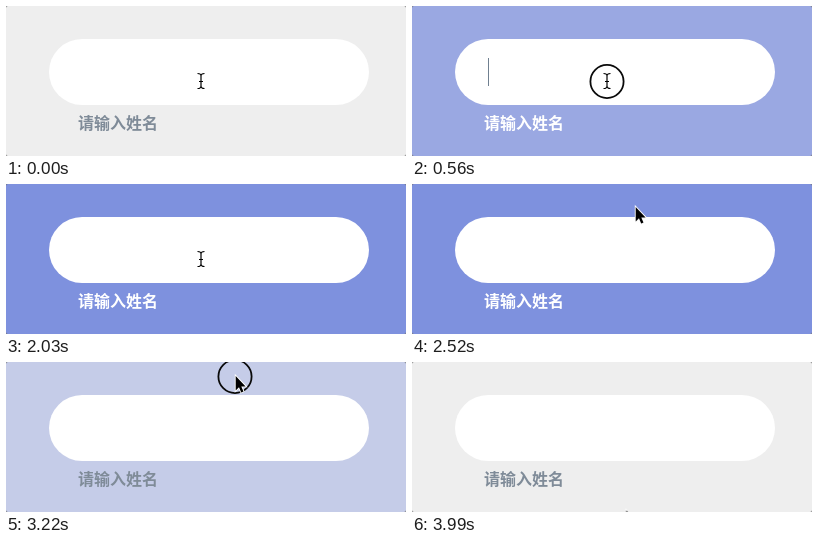
An HTML page for the animation above (4060 ms loop, 400 px wide and 150 px high).

```html
<!DOCTYPE html>
<html lang="zh-CN">
<head>
<meta charset="utf-8">
<title>Input focus</title>
<style>
  html, body { margin: 0; width: 100%; height: 100%; overflow: hidden; background: #777; }
  svg { display: block; width: 400px; height: 150px; }
  .page, .label, .caret, .pointer, .ring, .beam, .arrow { animation: 4060ms linear infinite; }

  .page { animation-name: page; }
  .label { animation-name: label; animation-timing-function: step-end; font: bold 16px "Noto Sans CJK SC", "Noto Sans CJK", sans-serif; }
  .caret { animation-name: caret; animation-timing-function: step-end; fill: #708090; }
  .pointer { animation-name: pointer; }
  .ring { animation-name: ring; fill: none; stroke: #0a0a0a; stroke-width: 1.8px; }
  .beam { animation-name: beam; animation-timing-function: step-end; fill: none; }
  .arrow { animation-name: arrow; animation-timing-function: step-end; fill: #000; stroke: #fff; stroke-width: 1.8px; paint-order: stroke; }

  @keyframes page {
    0%, 10.468% { fill: #eee; animation-timing-function: ease; }
    17.857% { fill: #7e91de; }
    76.601% { fill: #7e91de; animation-timing-function: ease; }
    83.99%, 100% { fill: #eee; }
  }
  @keyframes label {
    0%, 76.601%, 100% { fill: #7f8b98; }
    10.468% { fill: #fff; }
  }
  @keyframes caret {
    0%, 24.1%, 50%, 76.6%, 100% { opacity: 0; }
    10.468%, 37.9%, 63.75% { opacity: 1; }
  }
  @keyframes pointer {
    0%, 56.4% { transform: translate(195px, 75px); }
    62.07% { transform: translate(223px, 23px); animation-timing-function: ease-out; }
    68.97% { transform: translate(229px, 14px); }
    87.68% { transform: translate(229px, 14px); animation-timing-function: ease-in; }
    98.28%, 100% { transform: translate(213.5px, 148.5px); }
  }
  /* The ring closes in on the pointer at each press. */
  @keyframes ring {
    0%, 10.3% { opacity: 0; r: 27px; }
    10.34% { opacity: 1; r: 27px; }
    12.07%, 14.78% { opacity: 1; r: 16.6px; }
    14.8%, 75.7% { opacity: 0; r: 27px; }
    75.74% { opacity: 1; r: 27px; }
    77.586% { opacity: 1; r: 21.6px; }
    79.31%, 80.3% { opacity: 1; r: 16.6px; }
    80.32%, 100% { opacity: 0; r: 16.6px; }
  }
  @keyframes beam {
    0%, 90.64% { opacity: 1; }
    61.1%, 95.32%, 100% { opacity: 0; }
  }
  @keyframes arrow {
    0%, 90.64% { opacity: 0; }
    61.1%, 95.32%, 100% { opacity: 1; }
  }
</style>
</head>
<body>
<svg viewBox="0 0 400 150">
  <defs>
    <path id="beam" d="M-3.5-7.5Q0-7.5 0-5Q0-7.5 3.5-7.5M0-5V5M-3.5 7.5Q0 7.5 0 5Q0 7.5 3.5 7.5M-2 .5H2"/>
  </defs>
  <rect class="page" width="400" height="150" rx="2"/>
  <rect x="43" y="33" width="320" height="66" rx="33" fill="#fff"/>
  <text class="label" x="72" y="123">请输入姓名</text>
  <rect class="caret" x="76" y="52" width="1" height="28"/>
  <g class="pointer">
    <circle class="ring" cy=".5"/>
    <g class="beam">
      <use href="#beam" stroke="#fff" stroke-width="2.6"/>
      <use href="#beam" stroke="#000" stroke-width="1.2"/>
    </g>
    <path class="arrow" d="M.7 0V14.4L4 11.3 6.2 16.4 8.5 15.4 6.3 10.4H10.6Z"/>
  </g>
</svg>
<script>
  // Advance every animation on one 70 ms beat.
  const BEAT = 70, LOOP = 4060;
  const start = performance.now();
  const animations = document.getAnimations();
  animations.forEach(a => a.pause());

  function tick() {
    const elapsed = (performance.now() - start) % LOOP;
    const time = Math.floor((elapsed + 1) / BEAT) * BEAT % LOOP;
    animations.forEach(a => { a.currentTime = time; });
    requestAnimationFrame(tick);
  }
  tick();
</script>
</body>
</html>
```
